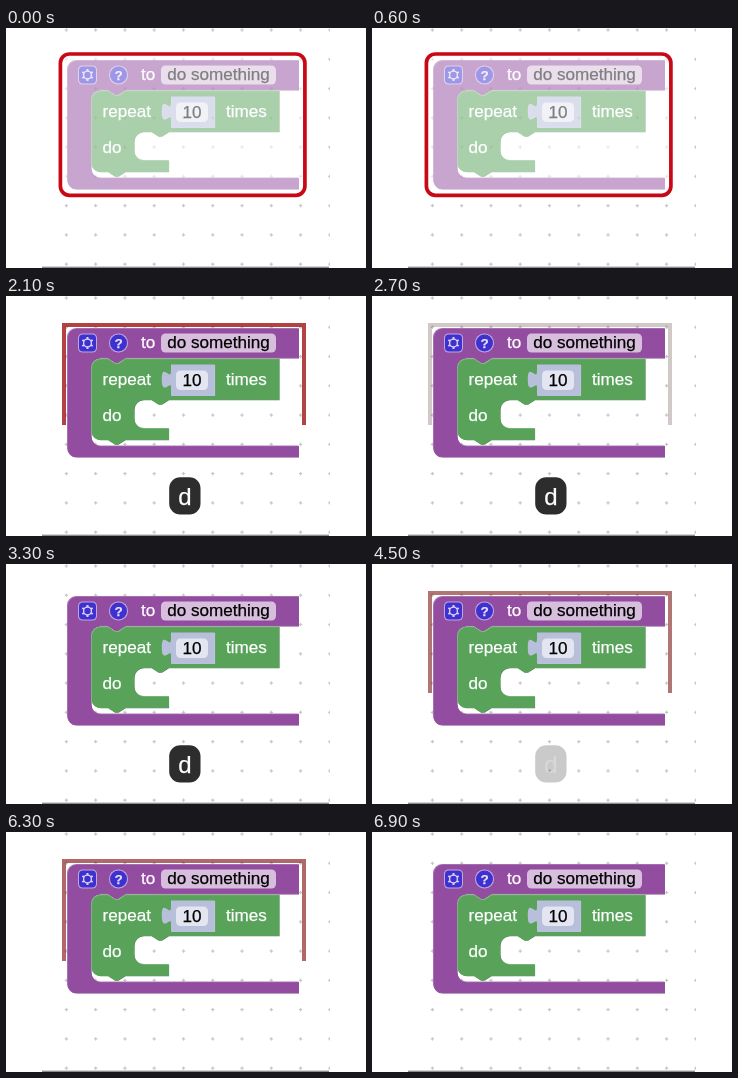
Animation, 360 px wide and 240 px high, one loop 7200 ms. Source, as an HTML page with a canvas:

```html
<!DOCTYPE html>
<html lang="en">
<head>
<meta charset="utf-8">
<title>Block cursor</title>
<style>
html, body { margin: 0; width: 100%; height: 100%; overflow: hidden; background: #fff; }
canvas { display: block; width: 360px; height: 240px; }
</style>
</head>
<body>
<canvas id="stage" width="360" height="240"></canvas>
<script>
const LOOP = 7200, STEP = 300;
const FONT = '"Liberation Sans", Arial, sans-serif';
const ctx = document.getElementById('stage').getContext('2d');

// Each pulse starts part-way through its fade.
const PULSES = [{ at: 2100, phase: 0.24 }, { at: 4200, phase: 0.18 }, { at: 6300, phase: 0.4 }];
const FADE = 1100;

const PROCEDURE = new Path2D(
  'M70 32 H292.4 V61.8 H119 l-7 4.6 h-3.4 l-7 -4.6 H94 a9 9 0 0 0 -9 9 V140.5 ' +
  'a9 9 0 0 0 9 9 H292.4 V161 H70 a9 9 0 0 1 -9 -9 V41 a9 9 0 0 1 9 -9 Z');
const REPEAT = new Path2D(
  'M94 62.5 H101.6 l7 4.6 h3.4 l7 -4.6 H273 V103.6 H162.5 l-7 4.6 h-3.4 l-7 -4.6 H137.5 ' +
  'a9.5 9.5 0 0 0 -9.5 9.5 V122.5 a9.5 9.5 0 0 0 9.5 9.5 H162.5 V143.6 H119 l-7 4.6 h-3.4 l-7 -4.6 H94 ' +
  'a9 9 0 0 1 -9 -9 V71.5 a9 9 0 0 1 9 -9 Z');
const NUMBER = new Path2D(
  'M165 68.5 H208.5 V99.5 H165 V92 c0 -11.5 -9.2 9.2 -9.2 -8.6 s9.2 2.9 9.2 -8.6 Z');

function layer() {
  const canvas = document.createElement('canvas');
  canvas.width = 360;
  canvas.height = 240;
  return canvas;
}

function box(c, x, y, w, h, r, fill) {
  c.fillStyle = fill;
  c.beginPath();
  c.roundRect(x, y, w, h, r);
  c.fill();
}

function label(c, text, x, y, color, size = 17.1, weight = '') {
  c.font = `${weight} ${size}px ${FONT}`;
  c.fillStyle = c.strokeStyle = color;
  c.lineWidth = 0.25;
  c.fillText(text, x, y);
  c.strokeText(text, x, y);
}

function emboss(c, path, main, light, dark) {
  c.save();
  c.translate(0.6, 0.6);
  c.fillStyle = dark;
  c.fill(path);
  c.restore();
  c.save();
  c.fillStyle = light;
  c.fill(path);
  c.clip(path);
  c.translate(0.8, 0.8);
  c.fillStyle = main;
  c.fill(path);
  c.restore();
}

function gear(c, x, y) {
  c.save();
  c.translate(x, y);
  c.strokeStyle = '#d9d2f4';
  c.lineWidth = 1.4;
  c.beginPath();
  c.arc(0, 0, 3.9, 0, Math.PI * 2);
  c.stroke();
  c.lineWidth = 2;
  for (let i = 0; i < 6; i++) {
    c.beginPath();
    c.moveTo(0, 4);
    c.lineTo(0, 6);
    c.stroke();
    c.rotate(Math.PI / 3);
  }
  c.restore();
}

function icon(c, x, radius) {
  box(c, x - 9.5, 37.5, 19, 19, radius + 0.5, '#bfa6dc');
  box(c, x - 8.5, 38.5, 17, 17, radius, '#3f30d0');
}

function makeBlocks() {
  const canvas = layer(), c = canvas.getContext('2d');
  emboss(c, PROCEDURE, '#934da0', '#ad78b7', '#793d85');
  emboss(c, REPEAT, '#58a25a', '#80ba82', '#458248');
  emboss(c, NUMBER, '#b7bfda', '#b7bfda', '#c3cbe0');

  icon(c, 81.5, 4);
  gear(c, 81.5, 47);
  icon(c, 112.5, 8.5);
  c.textAlign = 'center';
  label(c, '?', 112.5, 52, '#e6e0f8', 13.5, 'bold');
  c.textAlign = 'left';

  label(c, 'to', 135, 52.2, '#fff');
  box(c, 155, 37.5, 115, 19, 4.5, '#d6bedc');
  label(c, 'do something', 161.2, 52.2, '#000');
  label(c, 'repeat', 96.5, 89, '#fff');
  box(c, 170, 74.5, 32, 19.5, 4.5, '#e3e6f1');
  label(c, '10', 176.5, 89.8, '#000');
  label(c, 'times', 220, 89, '#fff');
  label(c, 'do', 96.5, 124.8, '#fff');
  return canvas;
}

function makeWorkspace() {
  const canvas = layer(), c = canvas.getContext('2d'), gap = 29.27;
  c.fillStyle = '#fff';
  c.fillRect(0, 0, 360, 240);
  c.save();
  c.beginPath();
  c.rect(36, 0, 288, 240);
  c.clip();
  c.fillStyle = '#c8c8c8';
  for (let col = 0; col < 10; col++) {
    for (let row = 0; row < 9; row++) {
      const x = 60.4 + col * gap, y = 2 + row * gap;
      c.fillRect(x - 1.7, y - 0.6, 3.4, 1.2);
      c.fillRect(x - 0.6, y - 1.7, 1.2, 3.4);
    }
  }
  c.restore();
  c.fillStyle = '#707070';
  c.fillRect(36, 238.7, 287, 1.1);
  return canvas;
}

const workspace = makeWorkspace();
const blocks = makeBlocks();

function drawSelected() {
  ctx.beginPath();
  ctx.roundRect(54.4, 26, 244.5, 141.3, 9);
  // A veil keeps the grid faint behind the faded blocks.
  ctx.fillStyle = 'rgba(255, 255, 255, 0.6)';
  ctx.fill();
  ctx.globalAlpha = 0.5;
  ctx.drawImage(blocks, 0, 0);
  ctx.globalAlpha = 1;
  ctx.strokeStyle = '#c90816';
  ctx.lineWidth = 3.7;
  ctx.stroke();
}

function drawCursor(t) {
  const pulse = PULSES.find(p => t >= p.at && t < p.at + 900);
  if (!pulse) return;
  const fade = pulse.phase + (t - pulse.at) / FADE;
  if (fade >= 0.92) return;
  // Red runs towards transparent black.
  const k = 1 - fade;
  ctx.strokeStyle = `rgba(${204 * k}, ${10 * k}, ${10 * k}, ${k})`;
  ctx.lineWidth = 4;
  ctx.beginPath();
  ctx.moveTo(58, 129);
  ctx.lineTo(58, 29);
  ctx.lineTo(298, 29);
  ctx.lineTo(298, 129);
  ctx.stroke();
}

function drawKey(t) {
  if (t < 1800 || t >= 4800) return;
  ctx.globalAlpha = t < 4500 ? 1 : 0.25;
  box(ctx, 163.2, 181.2, 31.3, 37.2, 11, '#2d2d2d');
  ctx.textAlign = 'center';
  label(ctx, 'd', 178.8, 208.7, '#fff', 24);
  ctx.textAlign = 'left';
  ctx.globalAlpha = 1;
}

function draw(now) {
  const t = Math.floor((now % LOOP) / STEP) * STEP;
  ctx.drawImage(workspace, 0, 0);
  if (t < 2100) {
    drawSelected();
  } else {
    drawCursor(t);
    ctx.drawImage(blocks, 0, 0);
  }
  drawKey(t);
}

const start = performance.now();
function tick() {
  draw(performance.now() - start);
  requestAnimationFrame(tick);
}
tick();
</script>
</body>
</html>
```
